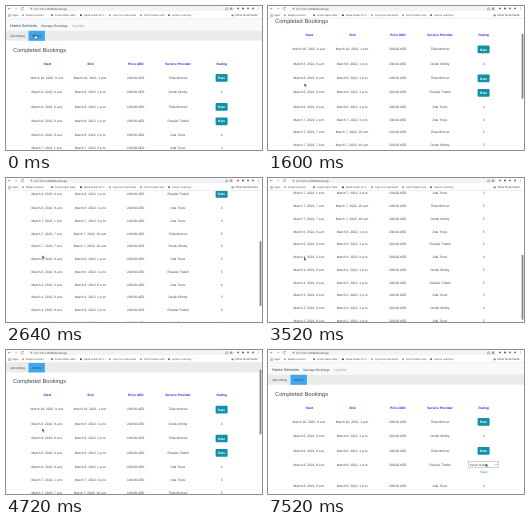
These frames come from a looping animation (256x144 px, 8000 ms). An HTML page:

```html
<!DOCTYPE html>
<html lang="en">
<head>
<meta charset="utf-8">
<title>Completed Bookings</title>
<style>
  html, body { margin: 0; height: 100%; overflow: hidden; background: #fff; }
  svg { display: block; width: 100vw; height: 100vh; }
  text {
    font-family: "Liberation Sans", Arial, sans-serif;
    text-rendering: geometricPrecision;
    white-space: pre;
  }
</style>
</head>
<body>
<svg id="stage" viewBox="0 0 256 144">
  <rect width="256" height="144" fill="#fff"/>
  <g id="page"></g>
  <rect id="thumb" x="253.6" width="1.8" height="65" rx=".9" fill="#858585"/>
  <g id="chrome"></g>
  <g id="arrow" stroke-linejoin="round">
    <path d="M0 0V3.4L.8 2.7L1.4 4L2 3.7L1.4 2.5H2.5Z" fill="#111" stroke="#fff" stroke-width=".35"/>
  </g>
  <g id="hand" stroke-linejoin="round">
    <path d="M0 0Q.4 -.4 .8 0V1.5L2.6 2V3.2L2.1 4.4H.3L-1 2.6L-.6 2.2L0 2.6Z" fill="#fff" stroke="#111" stroke-width=".4"/>
  </g>
</svg>
<script>
const LOOP = 8000, OPEN = 7440, GROW = 6.3;
const FIRST = 71.5, TALL = 14.45, PLAIN = 12.75, TALL_ROWS = 4;
const TEAL = '#1290a8', INK = '#40454a';
const COLS = [41.3, 84.5, 129.8, 172, 215.6];
const $ = id => document.getElementById(id);

function add(parent, tag, attrs, label) {
  const el = document.createElementNS('http://www.w3.org/2000/svg', tag);
  for (const k in attrs) el.setAttribute(k, attrs[k]);
  if (label !== undefined) el.textContent = label;
  parent.append(el);
  return el;
}

const box = (p, x, y, width, height, fill, more) =>
  add(p, 'rect', { x, y, width, height, fill, ...more });
const dot = (p, cx, cy, r, fill) => add(p, 'circle', { cx, cy, r, fill });
const line = (p, d, stroke = '#666') =>
  add(p, 'path', { d, stroke, fill: 'none', 'stroke-width': .45 });

// y is the vertical middle of the lettering
const label = (p, s, x, y, size = 3.25, fill = INK, more) =>
  add(p, 'text', { x, y: y + size * .35, 'font-size': size, fill, ...more }, s);
const centred = (p, s, x, y, size, fill, more) =>
  label(p, s, x, y, size, fill, { 'text-anchor': 'middle', ...more });

function drawChrome(g) {
  box(g, 0, 0, 256, 13, '#fff');
  box(g, 22, .2, 206, 4.8, '#f1f3f4', { rx: 2.4 });
  line(g, 'M4.6 2.6H2.2M3.3 1.5L2.2 2.6L3.3 3.7');
  line(g, 'M8.7 2.6H11.1M10 1.5L11.1 2.6L10 3.7', '#aaa');
  line(g, 'M17.4 1.8A1.3 1.3 0 1 0 17.6 3M17.6 1.1V2H16.7');
  dot(g, 25.5, 2.6, .8, '#888');
  label(g, '127.0.0.1:8000/bookings', 28, 2.6, 3, '#555');
  line(g, 'M219.5 2.2V3.9H222V2.2M220.7 3V1M225 1.5L226.3 3.7L224 2.3H226.2L224 3.7Z', '#777');
  [[232, '#d84a40'], [237, '#555'], [242, '#777'], [247, '#8b5fa8']]
    .forEach(([x, c]) => dot(g, x, 2.6, 1, c));
  [1.5, 2.6, 3.7].forEach(y => dot(g, 252.5, y, .3, '#555'));

  for (let i = 0; i < 9; i++)
    box(g, 2.4 + i % 3, 8 + Math.floor(i / 3), .7, .7, ['#d65b4a', '#4b86d8', '#5aa565'][i % 3]);
  label(g, 'Apps', 6.3, 9.3, 2.7);
  [
    [17, '#e8912d', 'Simple Invoices'],
    [46, '#c84a43', 'Code Helper Help...'],
    [75, '#35485f', 'Quick Guide for C...'],
    [104, '#999', 'Logo Icon Generator'],
    [135, '#e2803c', 'Color Palette Gen...'],
    [163, '#2670b8', 'Lesson Learning...']
  ].forEach(([x, c, s]) => {
    dot(g, x, 9.3, 1, c);
    label(g, s, x + 2.7, 9.3, 2.6);
  });
  box(g, 225.4, 8.4, 2.4, 1.9, '#888', { rx: .3 });
  label(g, 'Other Bookmarks', 229.3, 9.3, 2.9);
  box(g, 0, 12.5, 256, .5, '#dadce0');
}

const PEOPLE = ['Tilda Morrow', 'Derek Olmby', 'Rosalie Tindell', 'Ada Trove'];
// day, start, end, price, person, rating (0 shows a button)
const ROWS = [
  [10, '9 a.m.', '1 p.m.', 200, 0, 0],
  [8, '9 a.m.', '1 p.m.', 200, 1, 4],
  [8, '6 a.m.', '1 p.m.', 100, 0, 0],
  [8, '9 a.m.', '1 p.m.', 200, 2, 0],
  [8, '9 a.m.', '1 p.m.', 200, 3, 4],
  [7, '1 p.m.', '3 p.m.', 100, 3, 3],
  [7, '7 a.m.', '10 a.m.', 100, 0, 5],
  [7, '7 a.m.', '10 a.m.', 200, 1, 5],
  [6, '9 a.m.', '1 p.m.', 200, 3, 5],
  [6, '9 a.m.', '1 p.m.', 200, 2, 5],
  [4, '3 a.m.', '8 a.m.', 200, 3, 4],
  [4, '9 a.m.', '1 p.m.', 200, 1, 5],
  [4, '9 a.m.', '1 p.m.', 200, 2, 5],
  [3, '9 a.m.', '1 p.m.', 200, 3, 3],
  [3, '9 a.m.', '1 p.m.', 200, 1, 4],
  [2, '9 a.m.', '1 p.m.', 200, 3, 5]
];

let rateButton, picker, lower;

function drawButton(p, y) {
  const g = add(p, 'g', {});
  box(g, 209.6, y - 3.4, 12, 7.7, TEAL, { rx: .8 });
  centred(g, 'Rate', 215.6, y + .5, 3.25, '#fff', { 'font-weight': 700 });
  return g;
}

function drawPicker(p, y) {
  const g = add(p, 'g', {});
  box(g, 200.2, y - 3.2, 30.6, 5.8, '#fff', { stroke: '#8c8c8c', 'stroke-width': .4 });
  label(g, 'Select Rating', 201.8, y - .3, 3);
  line(g, `M227.4 ${y - .7}l.9 .9l.9 -.9`, '#333');
  centred(g, 'Save', 215.6, y + 7.3, 3.25, TEAL);
  return g;
}

function drawPage(g) {
  box(g, 0, 13, 256, 12, '#f8f9fa');
  label(g, 'Home Services', 4, 19.5, 4);
  label(g, 'Manage Bookings', 35.3, 19.4, 3.3);
  label(g, 'Log Out', 66, 19.4, 3.3, '#888');
  box(g, 0, 24.8, 256, 10, '#ebebeb');
  box(g, 22.5, 24.8, 16.4, 10, '#3ea6ee');
  label(g, 'Upcoming', 4.2, 30);
  centred(g, 'History', 30.7, 30);
  label(g, 'Completed Bookings', 7, 43.8, 5.75);
  ['Start', 'End', 'Price AED', 'Service Provider', 'Rating'].forEach((s, i) =>
    centred(g, s, COLS[i], 57.6, 3.25, '#2a22e0', { 'font-weight': 700 }));

  lower = add(g, 'g', {});
  let y = FIRST;
  ROWS.forEach(([day, from, to, price, who, rating], i) => {
    const p = i < TALL_ROWS ? g : lower;
    const date = `March ${day}, 2022, `;
    [date + from, date + to, price + '.00 AED', PEOPLE[who]].forEach((s, c) =>
      centred(p, s, COLS[c], y));
    if (rating) centred(p, rating, COLS[4], y);
    else rateButton = drawButton(p, y);
    if (i === TALL_ROWS - 1) picker = drawPicker(p, y);
    y += i < TALL_ROWS ? TALL : PLAIN;
  });
}

// Straight interpolation between [time, ...values]
function at(keys, t) {
  let i = 1;
  while (i < keys.length - 1 && t > keys[i][0]) i++;
  const a = keys[i - 1], b = keys[i];
  const k = Math.min(1, Math.max(0, (t - a[0]) / (b[0] - a[0])));
  return a.slice(1).map((v, n) => v + (b[n + 1] - v) * k);
}

const SCROLL = [
  [1200, 0], [1280, 5], [2000, 57.7], [2960, 120], [3280, 131], [3360, 131],
  [3440, 130], [3520, 127], [4160, 47.8], [4600, 18], [4900, 4], [5120, 0]
];
const POINTER = [
  [0, 28.8, 28.5], [80, 29, 30], [480, 35, 62], [880, 36.3, 77], [3360, 36.3, 77.5],
  [3520, 36, 79], [5760, 36.3, 78], [5840, 52.5, 77], [6080, 168.3, 108],
  [6160, 168.3, 108], [6400, 198.8, 113], [6480, 199.2, 113],
  [6960, 215, 117], [7360, 217.6, 113.2]
];

const show = (el, on) => el.setAttribute('visibility', on ? 'visible' : 'hidden');
const move = (el, x, y) => el.setAttribute('transform', `translate(${x} ${y})`);

function render(t) {
  const [scroll] = at(SCROLL, t), [x, y] = at(POINTER, t);
  const open = t >= OPEN;
  move($('page'), 0, -scroll);
  $('thumb').setAttribute('y', 13.4 + scroll * .5);
  show($('thumb'), t >= 1240 && t < 5280);
  show(rateButton, !open);
  show(picker, open);
  move(lower, 0, open ? GROW : 0);
  const onLink = (y < 35 && x < 39) || (!open && x > 209.4);
  show($('hand'), onLink);
  show($('arrow'), !onLink);
  move($('hand'), x, y);
  move($('arrow'), x, y);
}

drawPage($('page'));
drawChrome($('chrome'));
const start = performance.now();
function tick() {
  render((performance.now() - start) % LOOP);
  requestAnimationFrame(tick);
}
tick();
</script>
</body>
</html>
```
